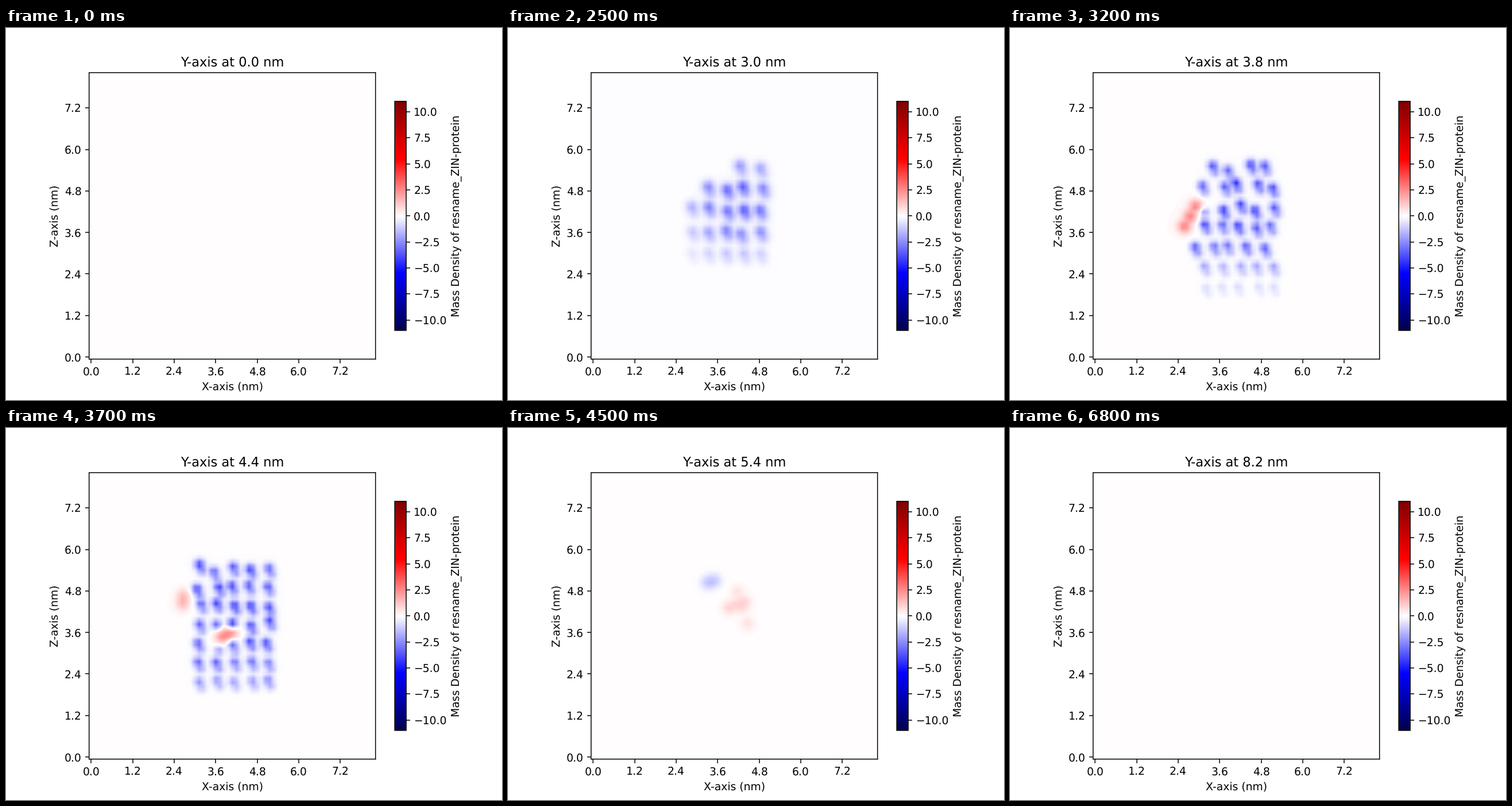
Write a matplotlib script that moves like this. It is 864x648 px and loops after 6900 ms.

```python
import numpy as np
import matplotlib.pyplot as plt
from matplotlib.animation import FuncAnimation

plt.rcParams.update({"text.hinting": "no_hinting", "path.snap": False})

BINS, STEP, VMAX, PITCH = 69, 0.12, 11, 4.15
GX, GZ = np.meshgrid(np.arange(BINS), np.arange(BINS))


def slab(seed, bottom, top, rows, left, cols=5, amp=4, foot=0.3,
         reach=30, corner=20):
    """Lattice of negative spots: orderly below, looser towards the top."""
    rng = np.random.default_rng(seed)
    spots = []
    for k, z in enumerate(np.linspace(bottom, top, rows)):
        height = (z - bottom) / (top - bottom)
        stagger = PITCH / 2 if k % 4 == 2 and rows > 6 and foot < 0.5 else 0
        for x in left - stagger + PITCH * np.arange(cols):
            dx, dz = rng.normal(0, 0.15 + 0.4 * height, 2)
            a = -amp * min(1, foot + 2 * height) * rng.uniform(0.8, 1.1)
            a *= np.exp(-((x - 35) ** 2 + (z - 37.5) ** 2) / (2 * reach ** 2))
            if z - x < corner:
                spots.append((x + dx, z + dz, a))
                spots.append((x + dx + 0.6, z + dz - 1.5, 0.6 * a))
    return spots


def stroke(x0, z0, x1, z1, amp):
    """Three spots along a short line."""
    return [(x0 + (x1 - x0) * t, z0 + (z1 - z0) * t, amp) for t in (0, 0.5, 1)]


def density(blue=(), red=(), sigma=0.8, base=0.04):
    """Soft envelope of gaussian spots; no blue spot sits on a red one."""
    free = [s for s in blue
            if all(np.hypot(s[0] - r[0], s[1] - r[1]) > 2.5 for r in red)]

    def envelope(spots, width):
        total = np.zeros((BINS, BINS))
        for x, z, a in spots:
            d = ((GX - x) ** 2 + (GZ - z) ** 2) / (2 * width ** 2)
            total += (a * (np.exp(-d) + 0.05 * np.exp(-d / 6))) ** 2
        return np.sqrt(total)

    return base + envelope(red, 1.1) - envelope(free, sigma)


left_red = stroke(21.5, 31.5, 24.2, 36.3, 2.6)
back_red = stroke(31.4, 29, 33.7, 29.8, 2.1) + stroke(22, 36.8, 22.2, 39, 1.2)
rear_red = stroke(32.7, 36, 36.3, 37.4, 0.9) + stroke(34.7, 39.8, 37.2, 32.2, 0.6)

# Slices in depth order; frames between them are blended.
LAYERS = [
    (21.5, density()),
    (25, density(slab(1, 25, 46, 5, 23.8, amp=3.4, foot=0.9, reach=9.5,
                      corner=13.5), sigma=1, base=-0.02)),
    (28.5, density(slab(2, 21, 47, 6, 25), left_red[:1], 0.9)),
    (32, density(slab(3, 17, 46, 7, 26.4, amp=4.2, foot=0.25), left_red)),
    (34.5, density(slab(4, 17, 47, 7, 26.2, foot=0.4), left_red[1:])),
    (37, density(slab(5, 18.4, 45.7, 7, 26.1, amp=4.2, foot=0.75), back_red)),
    (41, density(slab(6, 21, 44, 6, 27, 4, amp=3), rear_red[:3], 0.9)),
    (45, density(stroke(27.4, 42, 29.3, 42.5, -1), rear_red, 1.2)),
    (49, density()),
]
DEPTHS = [d for d, _ in LAYERS]


def field(i):
    i = np.clip(i, DEPTHS[0], DEPTHS[-1])
    k = min(int(np.searchsorted(DEPTHS, i, side="right")), len(LAYERS) - 1)
    (d0, a), (d1, b) = LAYERS[k - 1], LAYERS[k]
    t = (i - d0) / (d1 - d0)
    return a * (1 - t) + b * t


fig, ax = plt.subplots(figsize=(6.4, 4.8), dpi=135)
span = (-STEP / 2, (BINS - 0.5) * STEP)
img = ax.imshow(field(0), cmap="seismic", vmin=-VMAX, vmax=VMAX, origin="lower",
                extent=span * 2, interpolation="bilinear")
ticks = np.arange(0, BINS, 10) * STEP
labels = [f"{t:.1f}" for t in ticks]
ax.set_xticks(ticks, labels)
ax.set_yticks(ticks, labels)
ax.set_xlabel("X-axis (nm)")
ax.set_ylabel("Z-axis (nm)")
title = ax.set_title("Y-axis at 0.0 nm")
fig.colorbar(img, ax=ax, shrink=0.8, label="Mass Density of resname_ZIN-protein")


def update(i):
    img.set_data(field(i))
    title.set_text(f"Y-axis at {i * STEP:.1f} nm")
    return img, title


anim = FuncAnimation(fig, update, frames=BINS, interval=100, repeat=True,
                     repeat_delay=0, blit=False)
plt.show()
```
